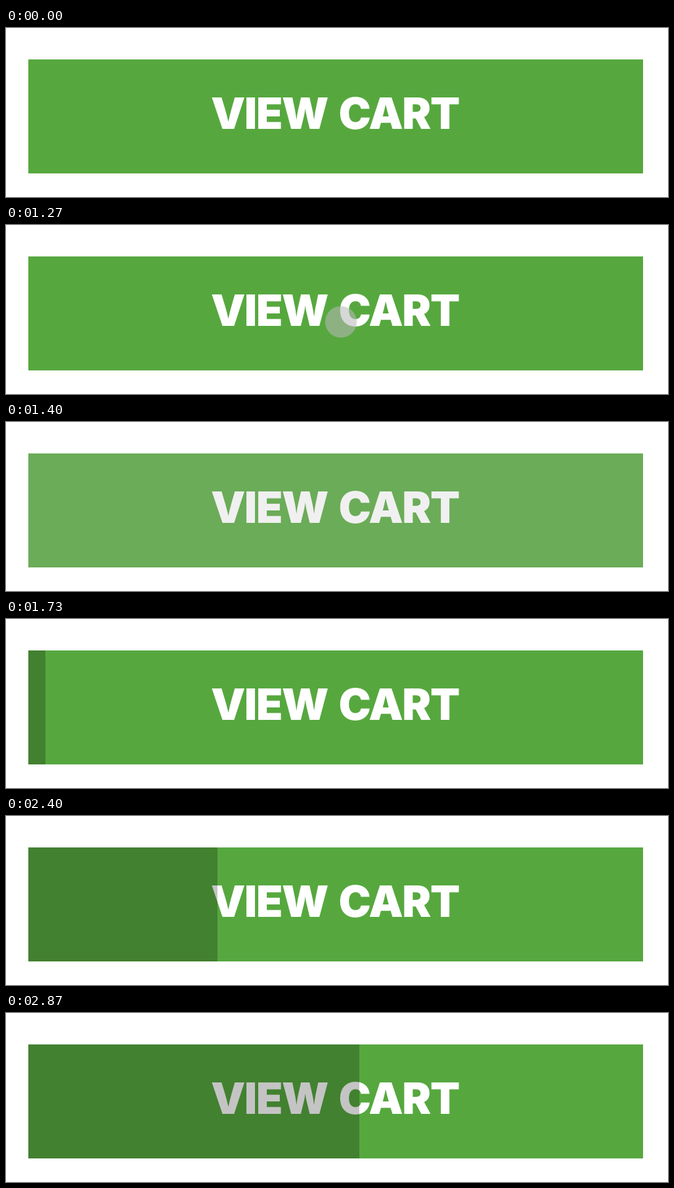
Write an HTML page with a canvas that moves like this. It is 1008x258 px and loops after 2.94 s.

```html
<!DOCTYPE html>
<html lang="en">
<head>
<meta charset="utf-8">
<title>View cart button</title>
<style>
  html, body { margin: 0; width: 100%; height: 100%; overflow: hidden; background: #fff; }
  canvas { display: block; }
</style>
</head>
<body>
<canvas id="stage" width="1008" height="258"></canvas>
<script>
const ctx = document.getElementById('stage').getContext('2d');
const LOOP = 2940;
const STEP = 200 / 3;
const LAST_TICK = 43;
const RIPPLE_TICK = 19;
const button = { x: 34, y: 48, w: 936, h: 174 };

// Draws a word with even tracking between two ink edges.
function drawWord(word, left, right) {
  ctx.letterSpacing = '0px';
  const m = ctx.measureText(word);
  const ink = m.actualBoundingBoxLeft + m.actualBoundingBoxRight;
  ctx.letterSpacing = (right - left - ink) / (word.length - 1) + 'px';
  ctx.fillText(word, left + m.actualBoundingBoxLeft, 154);
}

function drawButton() {
  ctx.fillStyle = '#56a83e';
  ctx.fillRect(button.x, button.y, button.w, button.h);
  ctx.fillStyle = '#fff';
  ctx.font = '900 66px Inter, Lato, sans-serif';
  ctx.fontKerning = 'normal';
  drawWord('VIEW', 313, 490);
  drawWord('CART', 508.5, 690);
}

// The tap grows across the button while it fades out.
function drawRipple(age) {
  const alpha = 0.57 - 0.18 * age;
  if (age < 0 || alpha <= 0) return;
  ctx.save();
  ctx.beginPath();
  ctx.rect(button.x, button.y, button.w, button.h);
  ctx.clip();
  ctx.fillStyle = `rgba(185, 185, 185, ${alpha})`;
  ctx.beginPath();
  ctx.arc(510, 148, 24 + 240 * age, 0, Math.PI * 2);
  ctx.fill();
  ctx.restore();
}

// Speeds up from rest, then eases off past the halfway point.
function progressWidth(tick) {
  if (tick < 22) return 0;
  if (tick <= 35) return 1.45 * (tick - 21.8) ** 2;
  const d = tick - 36;
  return 288 + 36 * d - 0.73 * d * d;
}

function draw(time) {
  const tick = Math.min(LAST_TICK, Math.floor((time % LOOP + 5) / STEP));
  ctx.fillStyle = '#fff';
  ctx.fillRect(0, 0, 1008, 258);
  drawButton();
  drawRipple(tick - RIPPLE_TICK);
  ctx.fillStyle = 'rgba(0, 0, 0, 0.23)';
  ctx.fillRect(button.x, button.y, Math.round(progressWidth(tick)), button.h);
}

const start = performance.now();
function loop() {
  draw(performance.now() - start);
  requestAnimationFrame(loop);
}
loop();
</script>
</body>
</html>
```
